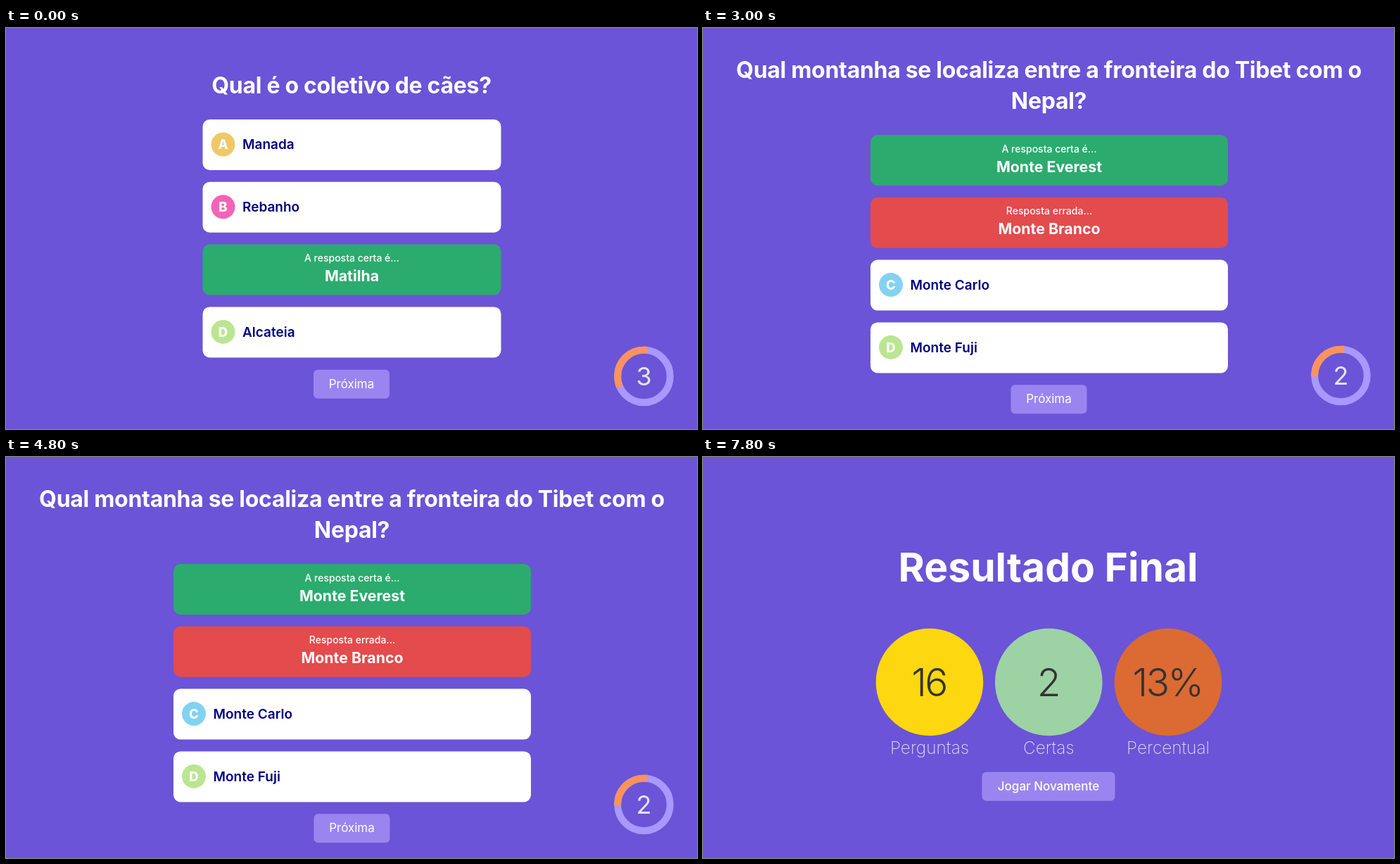
An HTML page that plays this animation: 982x570 px, repeating every 9 s.

```html
<!DOCTYPE html>
<html lang="pt-BR">
<head>
<meta charset="utf-8">
<title>Quiz</title>
<style>
  html, body { margin: 0; width: 100%; height: 100%; overflow: hidden; background: #6b54d7; }
  svg { display: block; width: 982px; height: 570px; font-family: Inter, "Open Sans", sans-serif; fill: #fff; }
  .mid text, text.mid { text-anchor: middle; }

  .scene { visibility: hidden; animation: show 9s step-end infinite; }
  .second { animation-delay: -6s; }
  .third { animation-delay: -3s; }
  @keyframes show {
    0% { visibility: visible; }
    33.3333%, 100% { visibility: hidden; }
  }

  .title { font-size: 32px; font-weight: 700; letter-spacing: -.3px; }
  .answer { font-size: 19px; font-weight: 600; fill: #000080; }
  .letter { font-size: 18.5px; font-weight: 800; }
  .note { font-size: 14px; font-weight: 500; }
  .reveal { font-size: 21.3px; font-weight: 700; }
  .button rect { fill: #9a85f0; }
  .button text { font-size: 17px; }
  .right { fill: #2cab6e; }
  .wrong { fill: #e34b4d; }

  .timer circle { fill: none; stroke: #a998fd; stroke-width: 10; }
  .timer .left { stroke: #fd925d; stroke-linecap: square; }
  .timer text { font-size: 36px; fill: #e8e2fb; }

  .headline { font-size: 57px; font-weight: 700; }
  .score { font-size: 55px; font-weight: 300; letter-spacing: -2.5px; fill: #333; }
  .label { font-size: 24.4px; font-weight: 200; fill: #e2dcf6; }
</style>
</head>
<body>
<svg viewBox="0 0 982 570"></svg>
<script>
  const text = (cls, x, y, str) => `<text class="${cls}" x="${x}" y="${y}">${str}</text>`;
  const box = (w, h, r, cls = "") => `<rect class="${cls}" width="${w}" height="${h}" rx="${r}"/>`;
  const at = (x, y, body, cls = "") => `<g class="${cls}" transform="translate(${x} ${y})">${body}</g>`;

  const colors = { A: "#f1c867", B: "#f364b8", C: "#84d2f1", D: "#bbe592" };

  const option = (letter, str) => w => box(w, 72, 10) +
    `<circle cx="29" cy="35.5" r="17" fill="${colors[letter]}"/>` +
    text("letter mid", 29, 42.3, letter) + text("answer", 56.5, 42.2, str);

  const verdict = (cls, note, str) => w => box(w, 72, 10, cls) +
    text("note mid", w / 2, 24.5, note) + text("reveal mid", w / 2, 52.5, str);

  const options = (x, y, w, list) =>
    list.map((draw, i) => at(x, y + i * 88.8, draw(w))).join("");

  const button = (x, y, w, str) =>
    at(x, y, box(w, 41, 6) + text("", w / 2, 26.3, str), "button mid");

  const timer = (y, digit, sweep) => at(906.5, y,
    `<circle r="37.3"/><circle class="left" r="37.3" pathLength="360"
      stroke-dasharray="${sweep} 360" transform="rotate(-90) scale(1 -1)"/>` +
    text("", 0, 13, digit), "timer mid");

  const score = (x, color, value, label) =>
    `<circle cx="${x}" cy="320" r="76.3" fill="${color}"/>` +
    text("score", x - 1, 340, value) + text("label", x, 422, label);

  const dogs = text("title mid", 491, 93, "Qual é o coletivo de cães?") +
    options(279.5, 130, 424, [
      option("A", "Manada"),
      option("B", "Rebanho"),
      verdict("right", "A resposta certa é...", "Matilha"),
      option("D", "Alcateia")
    ]) + button(437, 485.7, 108, "Próxima") + timer(495, 3, 106);

  const peaks =
    text("title mid", 491.5, 71, "Qual montanha se localiza entre a fronteira do Tibet com o") +
    text("title mid", 491.5, 115, "Nepal?") +
    options(238, 152, 508, [
      verdict("right", "A resposta certa é...", "Monte Everest"),
      verdict("wrong", "Resposta errada...", "Monte Branco"),
      option("C", "Monte Carlo"),
      option("D", "Monte Fuji")
    ]) + button(437.5, 507.2, 108, "Próxima") + timer(494, 2, 84);

  const result = `<g class="mid">` + text("headline", 490.5, 177, "Resultado Final") +
    score(322, "#fdd70f", "16", "Perguntas") +
    score(491.3, "#9dd2a5", "2", "Certas") +
    score(661, "#dc6a33", "13%", "Percentual") + "</g>" +
    `<g font-weight="500">${button(396.5, 447.8, 189, "Jogar Novamente")}</g>`;

  document.querySelector("svg").innerHTML =
    `<g class="scene">${dogs}</g><g class="scene second">${peaks}</g><g class="scene third">${result}</g>`;
</script>
</body>
</html>
```
